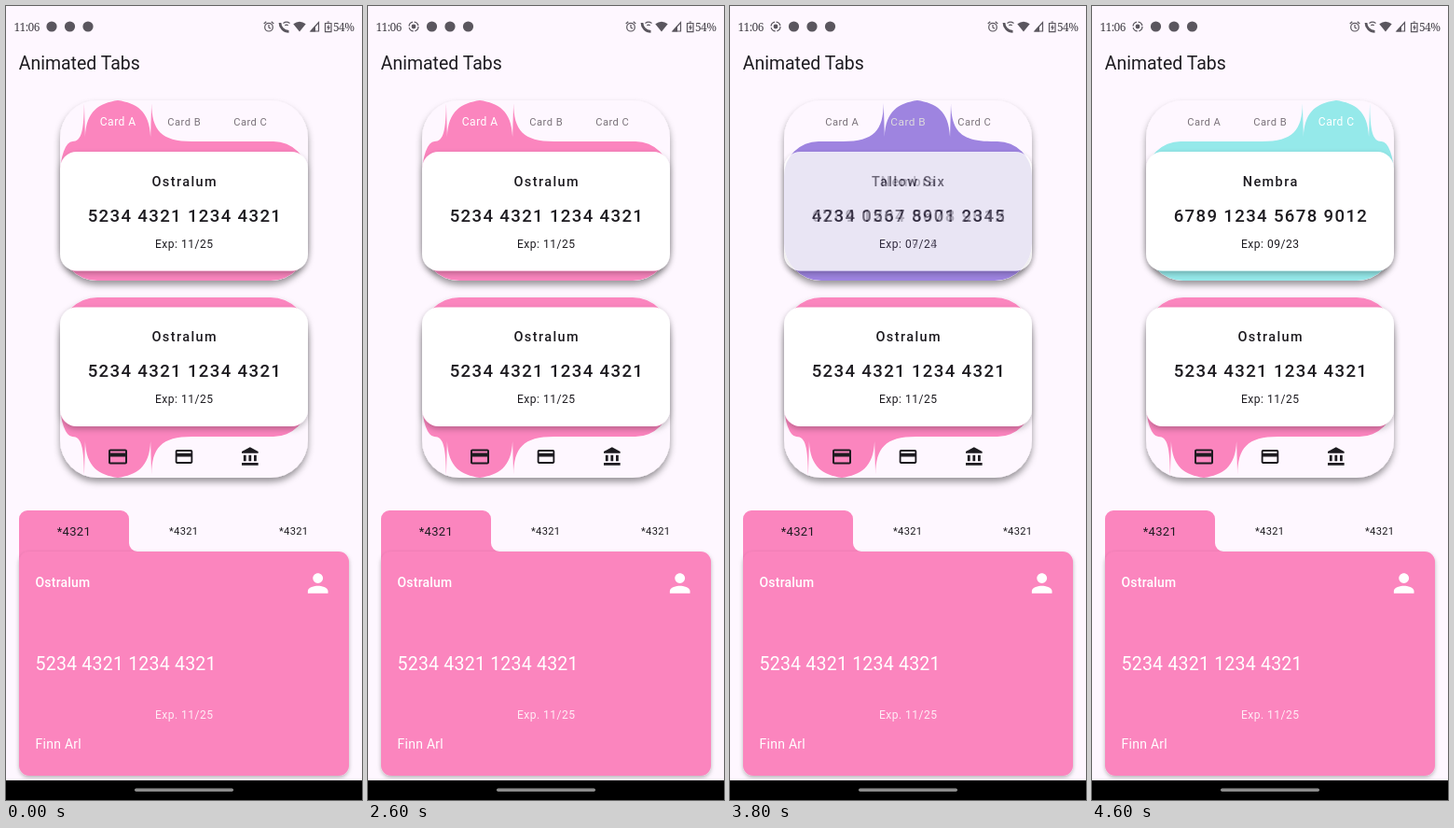
Recreate the animation shown at these times as an HTML page. Size 382x850 px, loop 5.4 s.

```html
<!DOCTYPE html>
<html lang="en">
<head>
<meta charset="utf-8">
<title>Animated Tabs</title>
<style>
  html, body { margin: 0; width: 100%; height: 100%; overflow: hidden; background: #fef7ff; }
  svg { display: block; width: 100vw; height: 100vh; }
  text { font-family: Roboto, sans-serif; fill: #1d1b20; white-space: pre; }
  .status text { font-family: "Noto Serif", serif; fill: #48454c; }
  .mid { text-anchor: middle; }
  .med { font-weight: 500; }
  .white, .white text { fill: #fff; }
</style>
</head>
<body>
<svg id="stage" viewBox="0 0 382 850"></svg>
<script>
const LOOP = 5400, TICK = 100;
const TAB_X = [120, 191, 262];
const COLORS = [[251, 133, 190], [160, 115, 222], [149, 233, 234]];
const CARDS = [
  ['Ostralum', '5234 4321 1234 4321', 'Exp: 11/25'],
  ['Tallow Six', '4234 0567 8901 2345', 'Exp: 07/24'],
  ['Nembra', '6789 1234 5678 9012', 'Exp: 09/23']
];
// time, tab position, card cross-fade
const MOVES = [
  [0, 0, 0], [2600, 0, 0], [2700, .4, .5], [2800, 1, 1],
  [3700, 1, 1], [3800, 1.14, 1.25], [3900, 1.66, 1.75], [4000, 2, 2], [LOOP, 2, 2]
];
const ICONS = {
  card: 'M20 4H4c-1.11 0-1.99.89-1.99 2L2 18c0 1.11.89 2 2 2h16c1.11 0 2-.89 2-2V6c0-1.11-.89-2-2-2zm0 14H4v-6h16v6zm0-10H4V6h16v2z',
  bank: 'M4 10v7h3v-7H4zm6 0v7h3v-7h-3zM2 22h19v-3H2v3zm14-12v7h3v-7h-3zm-4.5-9L2 6v2h19V6l-9.5-5z',
  person: 'M12 12c2.21 0 4-1.79 4-4s-1.79-4-4-4-4 1.79-4 4 1.79 4 4 4zm0 2c-2.67 0-8 1.34-8 4v2h16v-2c0-2.66-5.33-4-8-4z'
};

const clamp = (v, lo = 0, hi = 1) => Math.min(hi, Math.max(lo, v));
const mix = (a, b, p) => a + (b - a) * p;
const rgb = c => `rgb(${c.map(Math.round)})`;

const text = (x, y, size, str, cls = '', gap = 0, extra = '') =>
  `<text x="${x + (cls.includes('mid') ? gap / 2 : 0)}" y="${y}" font-size="${size}" class="${cls}" letter-spacing="${gap}" ${extra}>${str}</text>`;

const icon = (name, cx, cy, size, fill = '#1d1b20') =>
  `<path d="${ICONS[name]}" fill="${fill}" transform="translate(${cx - size / 2} ${cy - size / 2}) scale(${size / 24})"/>`;

const card = (y, [bank, number, exp], cls = '') => `<g class="${cls}">
  <rect x="58" y="${y}" width="266" height="127.5" rx="18" fill="#fff" filter="url(#cardShadow)"/>
  ${text(191, y + 36.5, 14.5, bank, 'mid med', 1.39)}
  ${text(191.3, y + 74.5, 18.6, number, 'mid med', 1.35)}
  ${text(191, y + 102.5, 12.07, exp, 'mid', .48)}</g>`;

const panelBox = y => `<rect x="58" y="${y}" width="266" height="193" rx="40" fill="#fef7ff"`;
const panel = y => panelBox(y) + ' filter="url(#panelShadow)"/>';

// Body with a domed tab between two spikes, centred on c
function tabPath(c) {
  const L = 58, R = 324, half = 35.5;
  const side = gap => {
    const flare = Math.min(44, gap * .5);
    return [flare, Math.min(37, gap - flare)];
  };
  const l = c - half, r = c + half;
  const [fl, cl] = side(l - L), [fr, cr] = side(R - r);
  return `M${L} 294V182A${cl} 37 0 0 1 ${L + cl} 145H${l - fl}
    C${l - fl * .25} 145 ${l - 1} 133 ${l - .6} 104L${l + .4} 140
    C${l + 1.5} 112 ${c - 20} 104 ${c} 101C${c + 20} 104 ${r - 1.5} 112 ${r - .4} 140
    L${r + .6} 104C${r + 1} 133 ${r + fr * .25} 145 ${r + fr} 145
    H${R - cr}A${cr} 37 0 0 1 ${R} 182V294Z`;
}

const shadow = (id, dy, blur, alpha) =>
  `<filter id="${id}" x="-10%" y="-15%" width="120%" height="135%">
    <feDropShadow dx="0" dy="${dy}" stdDeviation="${blur}" flood-color="#000" flood-opacity="${alpha}"/></filter>`;

const pink = rgb(COLORS[0]), ink = '#5a565e';

const statusBar = `<g class="status" fill="none" stroke="${ink}" stroke-width="1.2">
  <g stroke="none">${text(8.5, 27, 12, '11:06', '', -.6)}${text(351, 27, 12, '54%', '', -.6)}</g>
  <g id="record"><circle r="5" stroke-dasharray="6.2 1.65"/><circle r="2.4" fill="${ink}" stroke="none"/></g>
  <g id="notes" fill="${ink}" stroke="none">${[0, 19.5, 39].map(x => `<circle cx="${49 + x}" cy="22" r="5.6"/>`).join('')}</g>
  <circle cx="282" cy="22.7" r="4.3"/><path d="M282 20v3l2 1.3M276.7 19l2.6-2.2M287.3 19l-2.6-2.2"/>
  <path d="M294 18c0 5 4 9.3 9.5 9.3" stroke-width="2.8"/>
  <path d="M297.5 18.5q3.5-2.6 7 0M299.3 20.7q1.7-1.2 3.4 0"/>
  <path d="M308.3 19.3Q315 14 321.7 19.3L315 27.5Z" fill="${ink}" stroke="none"/>
  <path d="M327 27L335.5 17.5V27Z"/><path d="M326.5 27.5L332 21V27.5Z" fill="${ink}" stroke="none"/>
  <path d="M342.5 18.5h6.5v9.2h-6.5zM344.5 17h2.5"/>
  <path d="M346.5 19.5l-2.5 4h1.5v3l2.5-4h-1.5z" fill="${ink}" stroke="none"/>
</g>`;

// The dark rect is the shade that shows through fading cards
const topPanel = `${panel(101)}
  <g clip-path="url(#round)"><path id="tab"/></g>
  <rect x="59" y="157" width="264" height="125.5" rx="17" opacity=".1"/>
  ${CARDS.map(c => card(156, c, 'face')).join('')}
  ${['A', 'B', 'C'].map((n, i) => text(TAB_X[i], 127.5, 11.15, 'Card ' + n, 'mid label', .46)).join('')}`;

const midPanel = `${panel(312)}
  <g transform="matrix(1 0 0 -1 0 606)" clip-path="url(#round)"><path d="${tabPath(120)}" fill="${pink}"/></g>
  ${card(322.5, CARDS[0])}
  ${icon('card', 120, 482.5, 24)}${icon('card', 191, 482.5, 22.3)}${icon('bank', 262.3, 482.5, 22.3)}`;

const wallet = `<path d="M14 596V549a9 9 0 0 1 9-9H123a9 9 0 0 1 9 9V575a9 9 0 0 0 9 9V596Z" fill="${pink}"/>
  <rect x="14" y="584" width="354" height="240" rx="11" fill="${pink}" filter="url(#walletShadow)"/>
  ${text(72.7, 567, 13, '*4321', 'mid', .3)}
  ${[190.5, 308.5].map(x => text(x, 566.3, 11.15, '*4321', 'mid', .3)).join('')}
  <g class="white">
    ${text(31.5, 622.3, 13.93, CARDS[0][0], 'med', .23)}
    ${text(31.5, 710.7, 19.5, CARDS[0][1], '', .23)}
    ${text(191, 763, 12.07, 'Exp. 11/25', 'mid', .48, 'opacity=".85"')}
    ${text(31.5, 795, 13.93, 'Finn Arl', '', .3)}
  </g>
  ${icon('person', 334.7, 618, 32.5, '#fff')}`;

const stage = document.getElementById('stage');
stage.innerHTML = `<defs>
    ${shadow('cardShadow', 3, 3, .26)}${shadow('panelShadow', 4.5, 3.8, .4)}${shadow('walletShadow', 2, 2, .28)}
    <clipPath id="round">${panelBox(101)}/></clipPath>
  </defs>
  <rect width="382" height="850" fill="#fef7ff"/>
  ${statusBar}
  ${text(13.8, 68.3, 19.45, 'Animated Tabs')}
  ${topPanel}${midPanel}${wallet}
  <rect y="829" width="382" height="21"/>
  <rect x="138" y="837.6" width="106" height="3.4" rx="1.7" fill="#8c8c8c"/>`;

const tab = stage.querySelector('#tab');
const record = stage.querySelector('#record');
const notes = stage.querySelector('#notes');
const faces = [...stage.querySelectorAll('.face')];
const labels = [...stage.querySelectorAll('.label')];

function sample(t) {
  const i = MOVES.findIndex(m => m[0] > t);
  const a = MOVES[i - 1], b = MOVES[i];
  const p = (t - a[0]) / (b[0] - a[0]);
  return [mix(a[1], b[1], p), mix(a[2], b[2], p)];
}

function draw(t) {
  const [pos, fade] = sample(t);
  const from = Math.min(1, Math.floor(pos));
  const color = COLORS[from].map((v, k) => mix(v, COLORS[from + 1][k], pos - from));
  tab.setAttribute('d', tabPath(mix(TAB_X[0], TAB_X[2], pos / 2)));
  tab.setAttribute('fill', rgb(color));

  faces.forEach((f, i) => {
    const o = clamp(1 - Math.abs(fade - i));
    f.setAttribute('opacity', o);
    f.style.display = o ? '' : 'none';
  });
  labels.forEach((l, i) => {
    const on = clamp(1 - Math.abs(pos - i)) ** 2;
    l.style.fill = rgb([122, 114, 122].map(v => mix(v, 255, on)));
    l.setAttribute('font-size', mix(11.15, 12.07, on));
  });

  const slide = 1 - (1 - clamp(t / 300)) ** 2;
  notes.setAttribute('transform', `translate(${19.5 * slide} 0)`);
  record.setAttribute('transform', `translate(49 22) scale(${slide})`);
  record.setAttribute('opacity', slide);
}

const start = performance.now();
let last = -1;
function loop() {
  const t = Math.floor((performance.now() - start) % LOOP / TICK) * TICK;
  if (t !== last) draw(last = t);
  requestAnimationFrame(loop);
}
loop();
</script>
</body>
</html>
```
